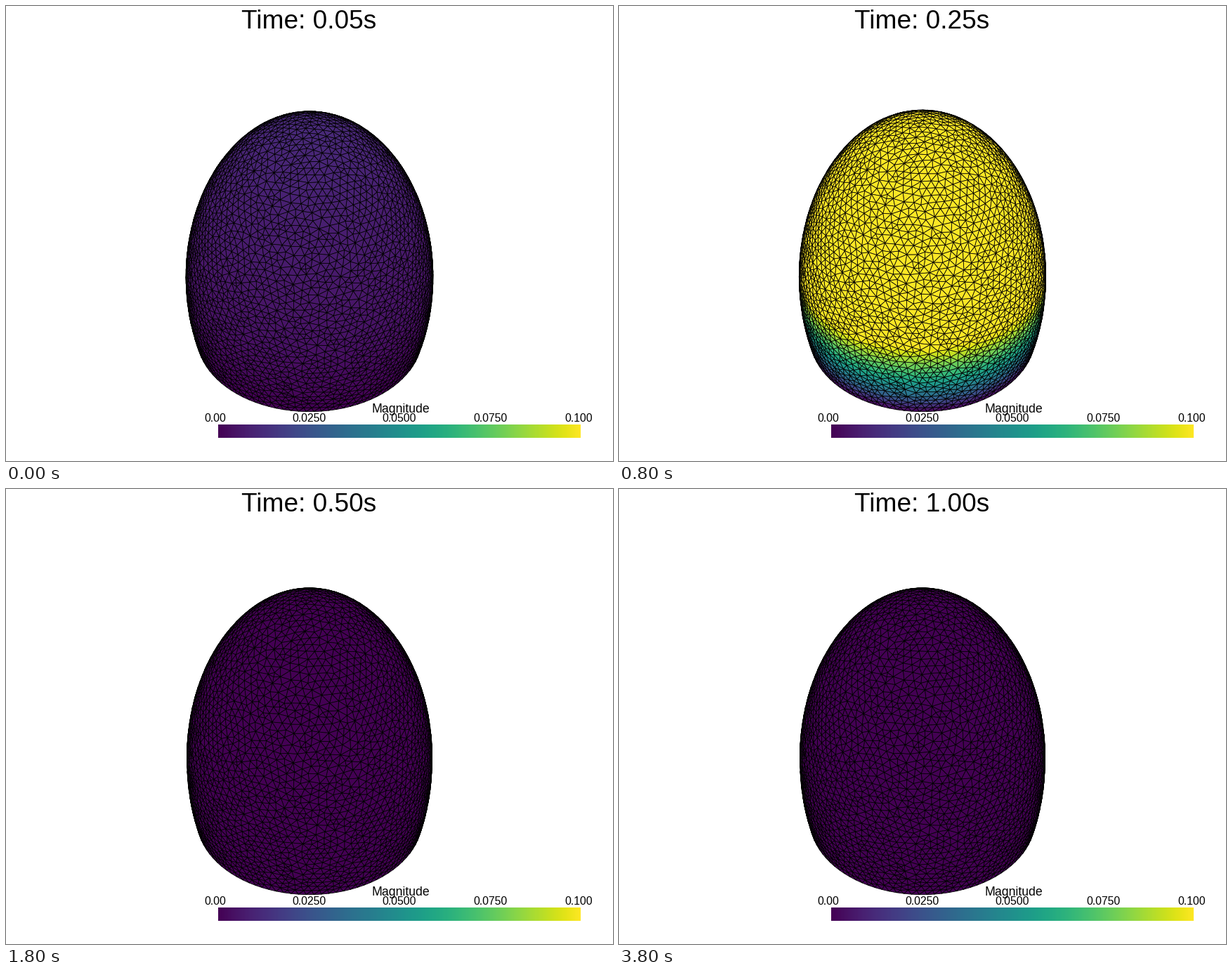
A matplotlib script that plays this animation: 864 by 648 pixels, repeating every 4 s.

```python
import numpy as np
import matplotlib.pyplot as plt
from matplotlib.animation import FuncAnimation
from matplotlib.collections import PolyCollection
from matplotlib.tri import Triangulation

W, H, DPI = 864, 648, 100
FRAMES, INTERVAL, DT = 20, 200, 0.05
PX = 72 / DPI

# Truncated spheroid (pixels) under an isometric perspective camera, 30 degree view
A, C, BASE = 181.3, 275.0, -82.0
MID = (C + BASE) / 2
SIN_E, COS_E = np.sqrt(1 / 3), np.sqrt(2 / 3)
DIST = H / 2 / np.tan(np.radians(15))
EDGE = 10.5

# Speed along the axis at 0.15 s, and its growth until the load stops at 0.5 s
AXIS_Z = [-82, -50, 0, 50, 100, 150, 200, 250, 275]
AXIS_SPEED = [0, 0.010, 0.022, 0.033, 0.041, 0.050, 0.059, 0.073, 0.083]
GAIN = np.zeros(FRAMES)
GAIN[:9] = [0.14, 0.45, 1, 1.9, 3.2, 5, 7, 7.4, 7]
STRETCH = np.cumsum(GAIN) / GAIN.sum()
STRETCH[9:] = 1.05


def spheroid(phi, theta):
    r = A * np.sin(phi)
    return np.column_stack([r * np.cos(theta), r * np.sin(theta), C * np.cos(phi)])


def build_mesh(rng, smoothing=4):
    """Nearly uniform triangles on the surface, Delaunay in a conformal map."""
    grid = np.linspace(1e-3, np.arccos(BASE / C), 4000)
    ds = np.hypot(A * np.cos(grid), C * np.sin(grid))

    def integrate(f):
        return np.r_[0, np.cumsum((f[1:] + f[:-1]) / 2 * np.diff(grid))]

    arc = integrate(ds)
    log_rho = np.log(grid[0]) + integrate(ds / (A * np.sin(grid)))

    def triangulate(pts):
        phi = np.arccos(np.clip(pts[:, 2] / C, -1, 1))
        theta = np.arctan2(pts[:, 1], pts[:, 0])
        rho = np.exp(np.interp(phi, grid, log_rho))
        return Triangulation(rho * np.cos(theta), rho * np.sin(theta))

    rows = round(arc[-1] / (EDGE * 0.866))
    step = arc[-1] / rows
    rings = [spheroid(np.array([2e-3]), np.zeros(1))]
    for k in range(1, rows + 1):
        radius = A * np.sin(np.interp(k * step, arc, grid))
        n = max(5, round(2 * np.pi * radius / EDGE))
        jitter = 0.0 if k == rows else 0.4
        s = k * step + jitter * step * rng.uniform(-1, 1, n)
        turn = np.arange(n) + rng.random() + jitter * rng.uniform(-1, 1, n)
        rings.append(spheroid(np.interp(s, arc, grid), 2 * np.pi * turn / n))
    pts = np.vstack(rings)
    free = len(pts) - len(rings[-1])

    for _ in range(smoothing):
        i, j = triangulate(pts).edges.T
        total, count = np.zeros_like(pts), np.zeros(len(pts))
        for p, q in ((i, j), (j, i)):
            np.add.at(total, p, pts[q])
            np.add.at(count, p, 1)
        mean = 0.5 * pts + 0.5 * total / np.maximum(count, 1)[:, None]
        mean /= np.linalg.norm(mean / [A, A, C], axis=1)[:, None]
        pts[:free] = mean[:free]
    return pts, triangulate(pts).triangles


points, faces = build_mesh(np.random.default_rng(7))
speed = np.interp(points[:, 2], AXIS_Z, AXIS_SPEED)
face_speed = speed[faces].mean(axis=1)
squeeze = 0.009 * np.clip((points[:, 2] - BASE) / 100, 0, 1)
lift = 10 * speed / max(AXIS_SPEED)


def project(amount):
    shrink = 1 - squeeze * amount
    x, y = points[:, 0] * shrink, points[:, 1] * shrink
    z = points[:, 2] - MID + lift * amount
    up = z * COS_E + y * SIN_E
    toward = z * SIN_E - y * COS_E
    scale = DIST / (DIST - toward)
    return np.column_stack([W / 2 + x * scale, H / 2 - up * scale])


fig = plt.figure(figsize=(W / DPI, H / DPI), dpi=DPI, facecolor="white")
ax = fig.add_axes([0, 0, 1, 1])
ax.axis("off")


def label(x, y, text, size):
    return ax.text(x, y, text, fontsize=size * PX, family="Liberation Sans",
                   color="black", ha="center", va="baseline", zorder=4)


mesh = PolyCollection([], cmap="viridis", edgecolors="black",
                      linewidths=0.8 * PX, zorder=2)
mesh.set_clim(0, 0.1)
ax.add_collection(mesh)

ax.imshow(np.linspace(0, 1, 256)[None], cmap="viridis", aspect="auto",
          interpolation="nearest", extent=(302, 818, 615, 596), zorder=3)
ax.set_xlim(0, W)
ax.set_ylim(H, 0)

for x, text in ((298, "0.00"), (431.5, "0.0250"), (560, "0.0500"),
                (689, "0.0750"), (815, "0.100")):
    label(x, 592, text, 15.7)
label(561.5, 579, "Magnitude", 17.6)
title = label(431.5, 32, "", 37)


def update(i):
    tris = project(STRETCH[i])[faces]
    u, v = tris[:, 1] - tris[:, 0], tris[:, 2] - tris[:, 0]
    front = u[:, 0] * v[:, 1] - u[:, 1] * v[:, 0] < 0
    mesh.set_verts(tris[front])
    mesh.set_array(face_speed[front] * GAIN[i])
    title.set_text(f"Time: {(i + 1) * DT:.2f}s")
    return mesh, title


anim = FuncAnimation(fig, update, frames=FRAMES, interval=INTERVAL, repeat=True)
plt.show()
```
